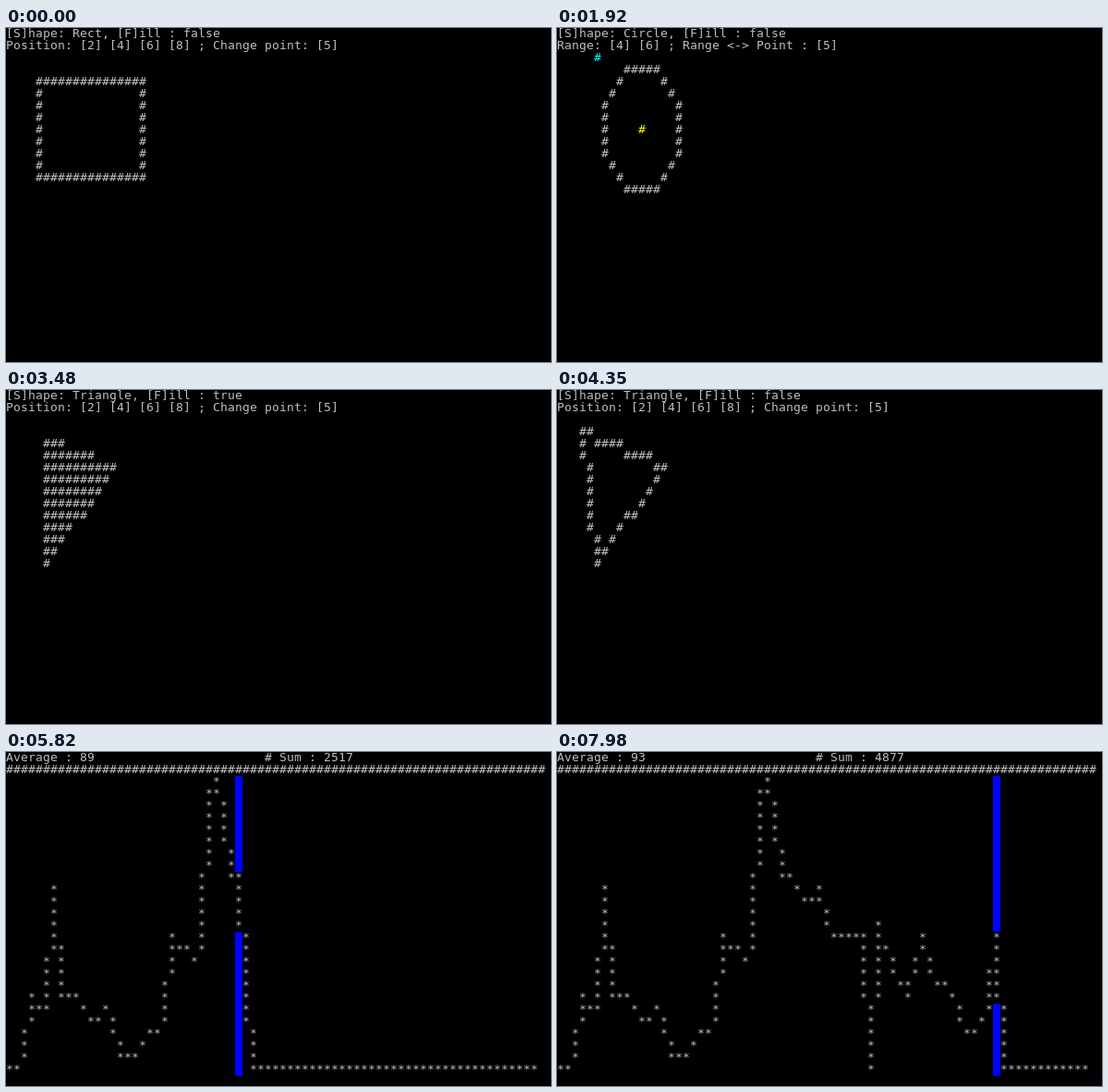
Animation of 590x362 px, one loop 8 s. Source, as an HTML page with a canvas:

```html
<!DOCTYPE html>
<html>
<head>
<meta charset="utf-8">
<style>
  html, body { margin: 0; width: 100%; height: 100%; overflow: hidden; background: #000; }
  canvas { display: block; }
</style>
</head>
<body>
<canvas id="screen" width="590" height="362"></canvas>
<script>
const ctx = document.getElementById('screen').getContext('2d');
const LOOP = 8000, CELL_W = 8, CELL_H = 13;
const GREY = '#c0c0c0', CYAN = '#00ffff', YELLOW = '#ffff00', BLUE = '#0000ff';

// Each character replaces its whole cell, as in a console.
function put(char, col, row, color = GREY) {
  const x = col * CELL_W, y = row * CELL_H;
  ctx.fillStyle = '#000';
  ctx.fillRect(x, y, CELL_W, CELL_H);
  ctx.fillStyle = color;
  ctx.fillText(char, x, y + 10);
}

function print(text, col, row) {
  [...text].forEach((char, i) => put(char, col + i, row));
}

// Cells of a straight line; ties stay with the left or upper end.
function line([x0, y0], [x1, y1]) {
  const steep = Math.abs(y1 - y0) > Math.abs(x1 - x0);
  let a = steep ? [y0, x0] : [x0, y0];
  let b = steep ? [y1, x1] : [x1, y1];
  if (a[0] > b[0]) [a, b] = [b, a];
  const length = b[0] - a[0], rise = b[1] - a[1];
  const cells = [];
  for (let i = 0; i <= length; i++) {
    const offset = length ? Math.ceil(Math.abs(rise) * i / length - 0.5) : 0;
    const minor = a[1] + Math.sign(rise) * offset;
    cells.push(steep ? [minor, a[0] + i] : [a[0] + i, minor]);
  }
  return cells;
}

function drawPolygon(points, filled) {
  const cells = points.flatMap((p, i) => line(p, points[(i + 1) % points.length]));
  cells.forEach(([x, y]) => put('#', x, y));
  if (!filled) return;
  for (const row of new Set(cells.map(c => c[1]))) {
    const cols = cells.filter(c => c[1] === row).map(c => c[0]);
    for (let x = Math.min(...cols); x <= Math.max(...cols); x++) put('#', x, row);
  }
}

function drawCircle(cx, cy, r, filled) {
  for (let y = -r; y <= r; y++) {
    for (let x = -r; x <= r; x++) {
      const d = Math.hypot(x, y);
      if (d < r - 0.5 && (filled || d >= r - 1.5)) put('#', cx + x, cy + y);
    }
  }
  put('#', cx, cy, YELLOW);
  put('#', cx - r, cy - r, CYAN);
}

const POSITION_HELP = 'Position: [2] [4] [6] [8] ; Change point: [5]';
const RANGE_HELP = 'Range: [4] [6] ; Range <-> Point : [5]';

const shapes = {
  Rect([x, y], filled) {
    drawPolygon([[x, y], [18, y], [18, 12], [x, 12]], filled);
  },
  Circle(radius, filled) {
    drawCircle(11, 8, radius, filled);
  },
  Triangle(corner, filled) {
    drawPolygon([corner, [14, 6], [5, 14]], filled);
  }
};

// start time, shape, filled, moving corner or radius
const steps = [
  [0, 'Rect', false, [4, 4]],
  [300, 'Rect', false, [5, 4]],
  [510, 'Rect', false, [6, 4]],
  [720, 'Rect', false, [7, 4]],
  [930, 'Rect', false, [7, 5]],
  [1860, 'Circle', false, 6],
  [2280, 'Circle', true, 6],
  [2850, 'Circle', true, 7],
  [2970, 'Circle', true, 8],
  [3090, 'Circle', true, 9],
  [3480, 'Triangle', true, [5, 4]],
  [3840, 'Triangle', false, [5, 4]],
  [4020, 'Triangle', false, [4, 3]],
  [4170, 'Triangle', false, [3, 3]]
];

function drawShapes(t) {
  const [, name, filled, param] = steps.filter(s => s[0] <= t).pop();
  print(`[S]hape: ${name}, [F]ill : ${filled}`, 0, 0);
  print(name === 'Circle' ? RANGE_HELP : POSITION_HELP, 0, 1);
  shapes[name](param, filled);
}

const GRAPH_START = 5580, FLOOR_ROW = 26, LAST_COL = 71;
const heights = [
  0, 1, 6, 5, 5, 15, 6, 6, 5, 4, 4, 5, 4, 1, 1, 2, 3, 3, 4, 11, 10, 9, 10, 23, 24, 21, 16, 16,
  14, 14, 15, 12, 11, 11, 11, 11, 0, 12, 10, 9, 7, 6,
  11, 8, 7, 7, 6, 5, 3, 4, 6, 11
];
const columnOf = i => i + 1 + Math.floor(i / 7);
const valueOf = (h, i) => h * (i >= 28 && i < 42 ? 1582 / 143 : 11.441);

function drawGraph(t) {
  const count = Math.floor(28.8 + (t - 5820) / 90);
  const shown = heights.slice(0, count);
  const sum = shown.reduce((total, h, i) => total + valueOf(h, i), 0);
  print(`Average : ${Math.floor(sum / count)}`, 0, 0);
  print(`# Sum : ${Math.floor(sum)}`, 35, 0);
  print('#'.repeat(73), 0, 1);

  ctx.fillStyle = BLUE;
  ctx.fillRect(columnOf(count - 1) * CELL_W, 2 * CELL_H, CELL_W, 25 * CELL_H);

  const points = [
    [0, FLOOR_ROW],
    ...shown.map((h, i) => [columnOf(i), FLOOR_ROW - h]),
    [columnOf(count), FLOOR_ROW],
    [LAST_COL, FLOOR_ROW]
  ];
  for (let i = 1; i < points.length; i++) {
    line(points[i - 1], points[i]).forEach(([x, y]) => put('*', x, y));
  }
}

function render(now) {
  const t = now % LOOP;
  ctx.fillStyle = '#000';
  ctx.fillRect(0, 0, 590, 362);
  ctx.font = '13px "DejaVu Sans Mono", monospace';
  if (t < GRAPH_START) drawShapes(t);
  else drawGraph(t);
}

const start = performance.now();
function tick() {
  render(performance.now() - start);
  requestAnimationFrame(tick);
}
tick();
</script>
</body>
</html>
```
